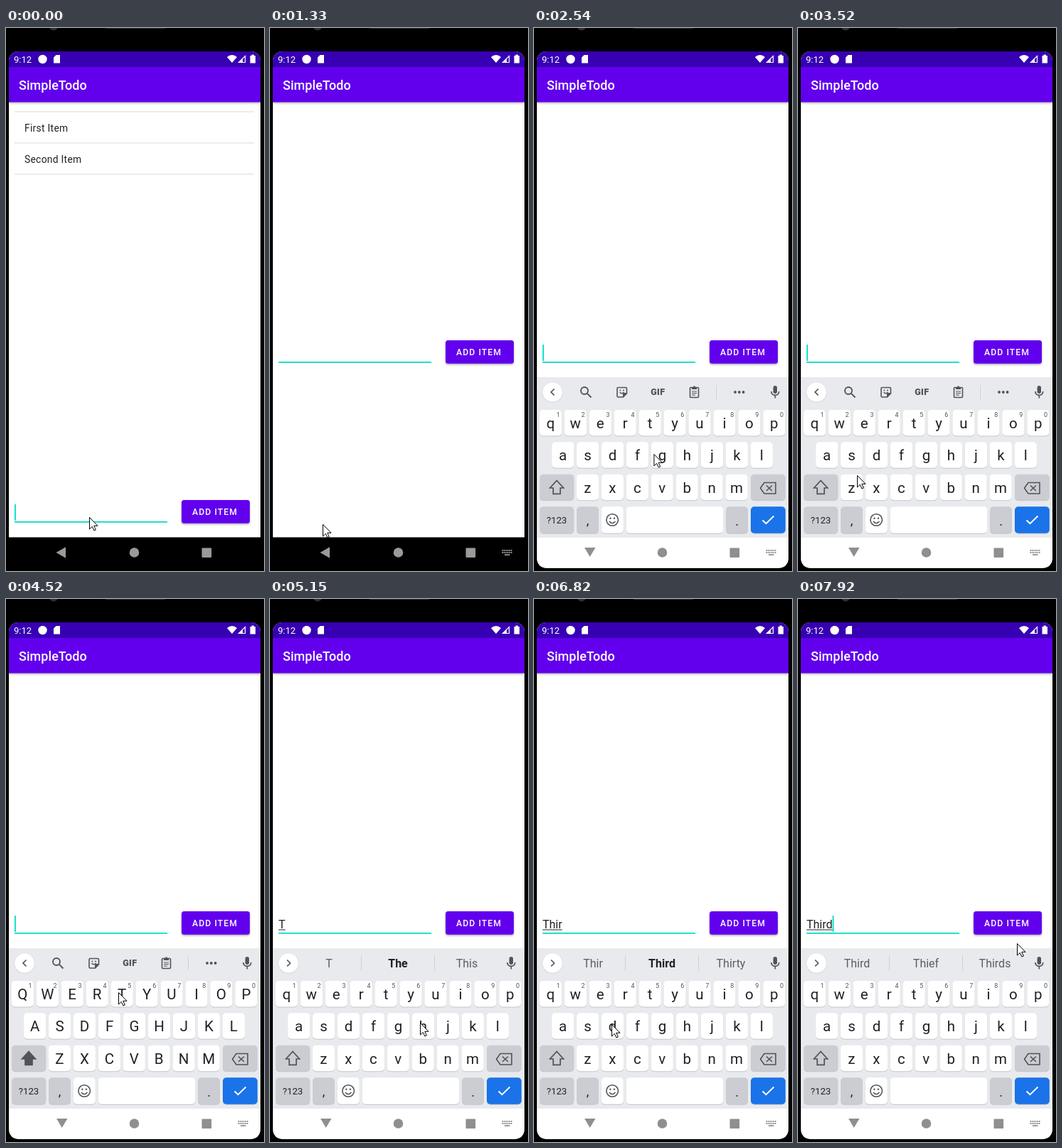
An HTML page with a canvas that plays this animation: 363x765 px, repeating every 8000 ms.

```html
<!DOCTYPE html>
<html lang="en">
<head>
<meta charset="utf-8">
<title>Todo list</title>
<style>
  html, body { margin: 0; width: 100%; height: 100%; overflow: hidden; background: #000; }
  canvas { display: block; width: 363px; height: 765px; }
</style>
</head>
<body>
<canvas id="stage"></canvas>
<script>
const LOOP = 8000, WIDTH = 363, HEIGHT = 765;
const canvas = document.getElementById('stage');
const ratio = window.devicePixelRatio || 1;
canvas.width = WIDTH * ratio;
canvas.height = HEIGHT * ratio;
const ctx = canvas.getContext('2d');
ctx.scale(ratio, ratio);

const INK = '#202124', ICON = '#505357', TEAL = '#03dac5', PURPLE = '#6200ee';
const RESIZED = 1330, KEYBOARD_IN = 1460, KEYBOARD_DONE = 1600, SHIFT_ON = 4050;

// Pointer tip: time, x, y
const POINTER = [
  [0, 117, 689], [600, 117, 689], [1060, 74, 699], [1460, 74, 699],
  [1600, 69, 696], [1760, 69, 696], [2260, 150, 600], [2600, 170, 600],
  [3360, 95, 606], [3520, 83, 630], [3670, 83, 630], [3950, 30, 641],
  [4150, 30, 641], [4520, 158, 554], [4700, 158, 554], [5150, 211, 597],
  [5430, 211, 597], [5800, 265, 553], [5930, 265, 553], [6260, 127, 552],
  [6510, 127, 552], [6800, 109, 599], [7000, 109, 599], [7450, 240, 493],
  [7640, 240, 493], [7920, 308, 485], [LOOP, 308, 485]
];

const TYPED = [
  { at: 4640, word: 'T', hints: ['T', 'The', 'This'] },
  { at: 5420, word: 'Th', hints: ['Th', 'The', 'This'] },
  { at: 5800, word: 'Thi', hints: ['Thi', 'Third', 'This'] },
  { at: 6300, word: 'Thir', hints: ['Thir', 'Third', 'Thirty'] },
  { at: 6900, word: 'Third', hints: ['Third', 'Thief', 'Thirds'], exact: true }
];

function rect(x, y, w, h, color, radius = 0) {
  ctx.fillStyle = color;
  ctx.beginPath();
  ctx.roundRect(x, y, w, h, radius);
  ctx.fill();
}

function dot(x, y, r, color) {
  ctx.fillStyle = color;
  ctx.beginPath();
  ctx.arc(x, y, r, 0, Math.PI * 2);
  ctx.fill();
}

function shape(d, color) {
  ctx.fillStyle = color;
  ctx.fill(new Path2D(d));
}

function line(d, color = ICON, width = 1.7) {
  ctx.strokeStyle = color;
  ctx.lineWidth = width;
  ctx.stroke(new Path2D(d));
}

function text(str, x, y, size, color, { weight = 400, align = 'left', spacing = 0 } = {}) {
  ctx.font = `${weight} ${size}px Roboto, sans-serif`;
  ctx.letterSpacing = spacing + 'px';
  ctx.textAlign = align;
  ctx.fillStyle = color;
  ctx.fillText(str, x, y);
}

function shadowed(blur, offset, alpha, draw) {
  ctx.save();
  ctx.shadowColor = `rgba(0,0,0,${alpha})`;
  ctx.shadowBlur = blur * ratio;
  ctx.shadowOffsetY = offset * ratio;
  draw();
  ctx.restore();
}

function pointerAt(t) {
  const i = Math.max(1, POINTER.findIndex(p => p[0] > t));
  const [t0, x0, y0] = POINTER[i - 1], [t1, x1, y1] = POINTER[i];
  const p = (t - t0) / (t1 - t0), ease = p * p * (3 - 2 * p);
  return [x0 + (x1 - x0) * ease, y0 + (y1 - y0) * ease];
}

function caretOn(t, entry) {
  if (entry) return (t - entry.at) % 1000 < 500;
  if (t < KEYBOARD_IN) return t < 150 || (t >= 680 && t < 1060);
  return (t + 500) % 1000 < 500;
}

function drawFrame() {
  rect(0, 0, WIDTH, HEIGHT, '#000');
  dot(67, -2.5, 6, '#303030');
  rect(140, -2, 84, 3, '#2b2b2b', 1);
  rect(4, 33, 354, 684.5, '#fff', [13, 13, 0, 0]);
}

function drawBars() {
  shadowed(3, 1, 0.3, () => rect(4, 55, 354, 49.5, PURPLE));
  rect(4, 33, 354, 22, '#3700b3', [13, 13, 0, 0]);
  text('9:12', 11, 49, 13, '#fff');
  dot(51.5, 44, 6.2, '#fff');
  shape('M70.5 38H76V49.5H67V41.5Z', '#fff');
  shape('M311 41Q318-3 318 38Q322 38 325 41L318 49Z'.replace('Q318-3 318 38', 'Q314 38 318 38'), '#fff');
  line('M327.5 48.5L336.5 39.5V48.5Z', '#fff', 1.2);
  shape('M326.5 49L333 42.5V49Z', '#fff');
  shape('M343.5 39H345.5V37.5H349V39H351V49.5H343.5Z', '#fff');
  text('SimpleTodo', 18, 87, 18, '#fff', { weight: 500, spacing: 0.05 });
}

function drawList() {
  for (const y of [117.5, 161.5, 205.5]) rect(12, y, 337, 1, '#dadada');
  text('First Item', 26, 146, 13.8, INK, { spacing: 0.3 });
  text('Second Item', 26, 190, 13.8, INK, { spacing: 0.3 });
}

function drawEntry(t, entry, top) {
  let caretX = 12;
  if (entry) {
    text(entry.word, 12, top + 24, 16, INK);
    const width = ctx.measureText(entry.word).width;
    rect(12, top + 25.5, width, 1, INK);
    caretX += width;
  }
  rect(12, top + 30, 215, 1.8, TEAL);
  if (caretOn(t, entry)) rect(caretX, top + 6, 1.8, 23, TEAL);
  shadowed(3, 1.5, 0.35, () => rect(247, top, 96, 32.8, PURPLE, 3.5));
  text('ADD ITEM', 262, top + 21.3, 12.2, '#fff', { weight: 500, spacing: 1.1 });
}

function drawNavigation(keyboardOpen, switcher) {
  const gray = keyboardOpen ? '#8f8f8f' : '#9a9a9a';
  shape(keyboardOpen ? 'M71 732H86.5L78.7 745Z' : 'M70.5 739L84 731.3V746.7Z', gray);
  dot(180.5, 739, 6.8, gray);
  rect(275.5, 732.5, 13.6, 13.4, gray, 1);
  if (!switcher) return;
  for (let row = 0; row < 2; row++)
    for (let col = 0; col < 5; col++) rect(326.5 + col * 3, 735 + row * 3, 2, 2, gray);
  rect(330, 741.3, 7.5, 1.8, gray);
}

function key(x, y, w, color = '#fff', h = 36.5) {
  rect(x, y + 1, w, h, '#c3c5ca', 5);
  rect(x, y, w, h, color, 5);
}

function keyRow(letters, center, y, caps, numbered) {
  [...letters].forEach((letter, i) => {
    const x = center + i * 34.95;
    key(x - 15.6, y, 31.2);
    text(caps ? letter.toUpperCase() : letter, x, y + 26, 20.5, INK, { align: 'center' });
    if (numbered) text((i + 1) % 10, x + 10.8, y + 10.2, 9, ICON, { align: 'center' });
  });
}

function drawTools() {
  line('M28.5 508.5L24 513L28.5 517.5');
  line('M76 511A5 5 0 1 1 66 511A5 5 0 1 1 76 511M74.7 514.7L80.5 520.5', ICON, 1.9);
  line('M118.5 506.5H129Q130.5 506.5 130.5 508V515L125.5 520H118.5Q117 520 117 518.5V508Q117 506.5 118.5 506.5Z', ICON, 1.6);
  shape('M130.5 514H126.5Q125 514 125 515.5V520Z', ICON);
  line('M120.5 513Q123.5 516.5 126.5 513', ICON, 1.3);
  dot(121.5, 510.5, 1, ICON);
  dot(126, 510.5, 1, ICON);
  text('GIF', 174.3, 517.3, 12.5, ICON, { weight: 900, align: 'center', spacing: 0.4 });
  line('M220.5 506.5H230.5Q231.5 506.5 231.5 507.5V519.5Q231.5 520.5 230.5 520.5H220.5Q219.5 520.5 219.5 519.5V507.5Q219.5 506.5 220.5 506.5Z', ICON, 1.6);
  shape('M222 506H223.5Q225.5 502.5 227.5 506H229V509H222Z', ICON);
  line('M222 512H229M222 514.5H229M222 517H227', ICON, 1.2);
  rect(256, 503, 1, 20, '#d0d2d6');
  for (const x of [283, 288.8, 294.6]) dot(x, 513, 1.9, ICON);
}

function drawHints({ hints, exact }) {
  line('M24 508.5L28.5 513L24 517.5');
  hints.forEach((word, i) => {
    const best = i === 1 && !exact;
    text(word, 83 + i * 97, 519, 16, best ? INK : '#5a5d61', { weight: best ? 700 : 400, align: 'center' });
  });
  rect(128, 502, 1, 22, '#cfd1d5');
  rect(231, 502, 1, 22, '#cfd1d5');
}

function drawKeyboard(t, entry) {
  const caps = t >= SHIFT_ON && !entry;
  const special = '#cbcdd3';
  rect(4, 492, 354, 269, '#fff', [0, 0, 13, 13]);
  rect(4, 492, 354, 226, '#e8eaed');
  shadowed(2, 0.5, 0.15, () => dot(26, 513, 13.8, '#fff'));
  if (entry) drawHints(entry); else drawTools();
  rect(336.6, 504, 5.4, 11, ICON, 2.7);
  line('M333.8 512Q334.3 517.3 339.3 517.3Q344.3 517.3 344.8 512M339.3 517.3V521.5');

  keyRow('qwertyuiop', 23.3, 538, caps, true);
  keyRow('asdfghjkl', 40.7, 583.2, caps);
  key(8, 628.8, 48.2, special);
  const arrow = 'M32 637.5L41.5 648H37V656.3H27V648H22.5Z';
  if (caps) shape(arrow, ICON);
  line(arrow);
  keyRow('zxcvbnm', 75.4, 628.8, caps);
  key(305, 628.8, 48.8, special);
  line('M324 640.5H340V656H324L318.5 648.2ZM327 644.5L335 652M335 644.5L327 652', ICON, 1.6);

  key(8, 674.3, 48.2, special, 37.5);
  text('?123', 32, 698, 13.2, INK, { align: 'center' });
  key(60, 674.3, 31, special, 37.5);
  text(',', 75.6, 700, 18, INK, { align: 'center' });
  key(94.8, 674.3, 31, '#fff', 37.5);
  line('M118.5 693A8.3 8.3 0 1 1 101.9 693A8.3 8.3 0 1 1 118.5 693', ICON, 1.6);
  line('M106 695Q110.2 700.5 114.4 695', ICON, 1.5);
  dot(107.4, 690.7, 1.2, ICON);
  dot(113, 690.7, 1.2, ICON);
  key(129.7, 674.3, 136.5, '#fff', 37.5);
  key(270, 674.3, 31, special, 37.5);
  text('.', 285.5, 701, 18, INK, { align: 'center' });
  key(305, 674.3, 48.8, '#1a73e8', 37.5);
  line('M321.5 693.5L326.5 698.3L337.5 687.5', '#fff', 1.9);
  drawNavigation(true, true);
}

function drawPointer(t) {
  const [x, y] = pointerAt(t);
  ctx.save();
  ctx.translate(x + 0.5, y + 0.5);
  const arrow = 'M0 0V16.5L3.8 12.9L6.4 18.5L8.8 17.5L6.3 11.8H11.5Z';
  shape(arrow, '#fff');
  line(arrow, '#000', 1);
  ctx.restore();
}

function render(t) {
  const resized = t >= RESIZED;
  const entry = TYPED.filter(e => t >= e.at).pop();
  drawFrame();
  if (!resized) drawList();
  drawBars();
  drawEntry(t, entry, resized ? 440 : 665);
  drawNavigation(false, resized);
  if (t >= KEYBOARD_IN) {
    const left = Math.max(0, (KEYBOARD_DONE - t) / 200);
    ctx.save();
    ctx.beginPath();
    ctx.roundRect(4, 33, 354, 728, 13);
    ctx.clip();
    ctx.translate(0, 269 * left * left);
    drawKeyboard(t, entry);
    ctx.restore();
  }
  drawPointer(t);
}

const start = performance.now();
function tick() {
  render((performance.now() - start) % LOOP);
  requestAnimationFrame(tick);
}
tick();
</script>
</body>
</html>
```
